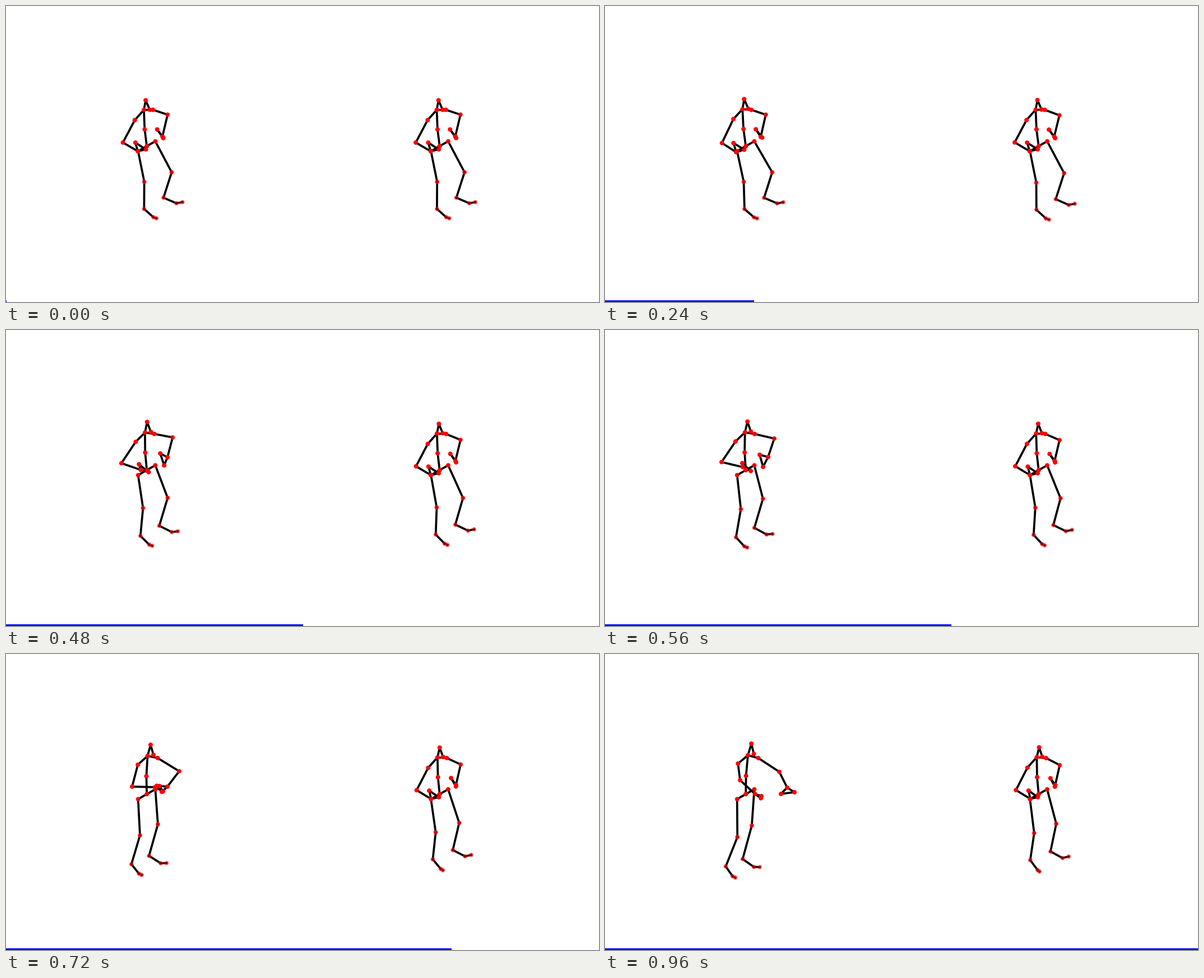
These frames come from a looping animation (1058x529 px, 1 s). A matplotlib script:

```python
import numpy as np
import matplotlib.pyplot as plt
from matplotlib.animation import FuncAnimation
from matplotlib.collections import LineCollection
from matplotlib.patches import Rectangle

W, H, DPI = 1058, 529, 100
FRAMES, STEP = 25, 40
LAST = FRAMES - 1
GAP = 522.5  # distance between the two figures

# Shared starting pose, in pixels from the top left
START = {
    "pelvis": (251.2, 250.4), "spine": (247.4, 220.5), "thorax": (246, 185.7),
    "head": (249.2, 168.5), "nose": (256.5, 185.5),
    "l_shoulder": (229.7, 204), "l_elbow": (208.6, 244), "l_wrist": (235.2, 259.6),
    "l_thumb": (230.8, 244.2), "l_hand": (249.5, 256.3),
    "r_shoulder": (262.2, 185.5), "r_elbow": (288.3, 194.2), "r_wrist": (279.1, 233.2),
    "r_thumb": (269.7, 220.6), "r_hand": (280.6, 236),
    "l_hip": (235.7, 259.4), "l_knee": (246.7, 314.2), "l_ankle": (246.4, 362.7),
    "l_foot": (263, 377.5), "l_toe": (268.4, 379.4),
    "r_hip": (266.4, 241.8), "r_knee": (295.6, 297.1), "r_ankle": (281, 342.6),
    "r_foot": (304, 352.5), "r_toe": (314.8, 350.5),
}

CHAINS = [
    "pelvis l_hip l_knee l_ankle l_foot l_toe",
    "pelvis r_hip r_knee r_ankle r_foot r_toe",
    "pelvis spine thorax head nose",
    "thorax l_shoulder l_elbow l_wrist l_thumb l_hand l_wrist",
    "thorax r_shoulder r_elbow r_wrist r_thumb r_hand r_wrist",
]
BONES = [pair for c in CHAINS for pair in zip(c.split(), c.split()[1:])]

# Joints further away are fainter
FADE = {"hip": 0.9, "knee": 0.72, "ankle": 0.5, "foot": 0.48, "toe": 0.45}

# How far each joint travels over the loop
LIVELY = {
    "spine": (4.2, -2.8), "thorax": (9, -4.7), "head": (12, -8.3), "nose": (9, -7),
    "l_shoulder": (7.6, -8.2), "r_shoulder": (11.4, 0.5),
    "l_knee": (-10.5, 13), "l_ankle": (-31, 17), "l_foot": (-35.3, 19.7),
    "l_toe": (-36, 20.3), "r_knee": (-33.7, 9.5), "r_ankle": (-35.4, 23.8),
    "r_foot": (-38.5, 28), "r_toe": (-38.8, 30.3),
}
CALM = {
    "spine": (1, -0.4), "thorax": (1.8, -1.2), "head": (2.8, -1.6), "nose": (1.2, -1.9),
    "l_shoulder": (1.4, -0.8), "l_elbow": (2.1, -0.8), "l_wrist": (1.1, -0.7),
    "l_thumb": (2.4, 0), "l_hand": (0.2, -0.5),
    "r_shoulder": (2.3, 0.5), "r_elbow": (0.5, 4.4), "r_wrist": (1.7, 0.8),
    "r_thumb": (2.5, 1.5), "r_hand": (-0.5, 1),
    "l_knee": (-3.5, 5.9), "l_ankle": (-10.2, 5.7), "l_foot": (-13.6, 8.7),
    "l_toe": (-15.7, 9.4), "r_knee": (-13, 6.3), "r_ankle": (-8.7, 10.4),
    "r_foot": (-10.2, 12.1), "r_toe": (-10, 11.5),
}

# The lively arms rest, then gesture through these points
GESTURE_KEYS = [0, 8, 14, 18, 21, 24]
GESTURE = {
    "l_elbow": [(208, 236), (225, 237), (238, 232), (241, 225.5)],
    "l_wrist": [(246, 245), (266, 238), (276, 249), (267.5, 250)],
    "l_thumb": [(245, 238), (273.7, 236), (282, 252), (278, 257.7)],
    "l_hand": [(260, 252), (280, 245.5), (291, 249), (279, 254)],
    "r_elbow": [(302, 194), (309, 209.5), (307, 214.5), (311, 210.6)],
    "r_wrist": [(291, 227), (288, 237), (297, 245), (325, 238.7)],
    "r_thumb": [(276, 223), (269, 235.6), (282, 252), (314, 250)],
    "r_hand": [(282, 244.6), (278, 246.4), (297, 258), (338, 247)],
}


def curve(keys, vals, t):
    """Smooth cubic through vals (numbers or points) at the given keys."""
    vals = np.array(vals, float)
    slope = np.gradient(vals, keys, axis=0)
    k = min(np.searchsorted(keys, t, side="right") - 1, len(keys) - 2)
    span = keys[k + 1] - keys[k]
    u = (t - keys[k]) / span
    return ((1 + 2 * u) * (1 - u) ** 2 * vals[k]
            + u * (1 - u) ** 2 * span * slope[k]
            + u * u * (3 - 2 * u) * vals[k + 1]
            + u * u * (u - 1) * span * slope[k + 1])


def sway(t):
    """Sideways progress: a slight lean back, then a long swing."""
    return curve([0, 6, 10, 14, 18, 21, 24],
                 [0, -0.08, 0.04, 0.41, 0.73, 0.86, 1], t)


def steady(t):
    return t / LAST


def late(t):
    """Ease in and out after a short wait."""
    u = np.clip((t - 5) / (LAST - 5), 0, 1)
    return u * u * (3 - 2 * u)


def part(name):
    return name.split("_")[-1]


class Figure:
    def __init__(self, ax, shift, travel, leg_drop, gesture):
        self.shift, self.travel = shift, travel
        self.leg_drop, self.gesture = leg_drop, gesture
        self.bones = LineCollection([], colors="black", linewidths=2.7,
                                    capstyle="projecting", zorder=1)
        ax.add_collection(self.bones)
        colors = [(1, 0, 0, 0.85 if n == "r_elbow" else FADE.get(part(n), 1))
                  for n in START]
        self.dots = ax.scatter(*zip(*START.values()), s=20, linewidths=1.3,
                               facecolors=colors, edgecolors=colors, zorder=2)

    def joint(self, name, t):
        x, y = START[name]
        if name in self.gesture:
            path = [(x, y), (x, y)] + self.gesture[name]
            x, y = curve(GESTURE_KEYS, path, t)
        else:
            dx, dy = self.travel.get(name, (0, 0))
            drop = self.leg_drop if part(name) in FADE else steady
            x, y = x + dx * sway(t), y + dy * drop(t)
        return x + self.shift, y

    def pose(self, t):
        at = {name: self.joint(name, t) for name in START}
        self.bones.set_segments([(at[a], at[b]) for a, b in BONES])
        self.dots.set_offsets(list(at.values()))


fig = plt.figure(figsize=(W / DPI, H / DPI), dpi=DPI, facecolor="white")
ax = fig.add_axes([0, 0, 1, 1])
ax.axis("off")

figures = [Figure(ax, 0, LIVELY, late, GESTURE),
           Figure(ax, GAP, CALM, steady, {})]
bar = ax.add_patch(Rectangle((0, H - 2.9), 1, 2.9, color="blue", linewidth=0))
ax.set_xlim(0, W)
ax.set_ylim(H, 0)


def update(i):
    for f in figures:
        f.pose(i)
    bar.set_width(W * i / LAST + 1)
    return []


anim = FuncAnimation(fig, update, frames=FRAMES, interval=STEP,
                     repeat=True, repeat_delay=0, blit=False)
plt.show()
```
